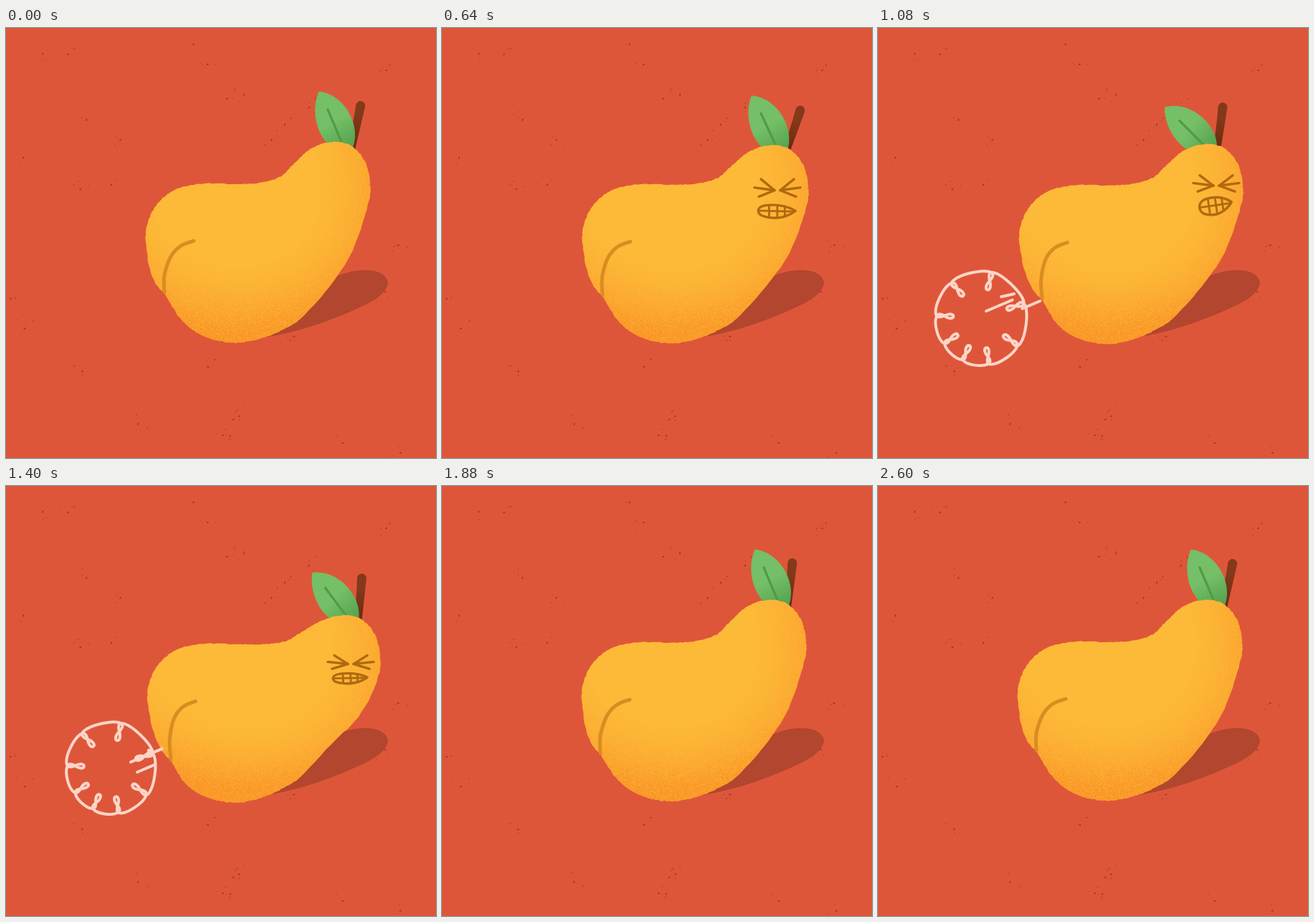
An HTML page with a canvas for the animation above (3080 ms loop, 600x600 px).

```html
<!DOCTYPE html>
<html lang="en">
<head>
<meta charset="utf-8">
<title>Pear</title>
<style>
html, body { margin: 0; width: 100%; height: 100%; overflow: hidden; background: #de5639; }
canvas { display: block; width: 600px; height: 600px; }
</style>
</head>
<body>
<canvas id="stage" width="600" height="600"></canvas>
<script>
const LOOP = 3080, STEP = 40, SIZE = 600, TAU = Math.PI * 2, DEG = Math.PI / 180;
const ctx = document.getElementById('stage').getContext('2d');

const clamp = (v, a = 0, b = 1) => Math.min(b, Math.max(a, v));
const mix = (a, b, k) => a + (b - a) * k;
const smooth = v => { v = clamp(v); return v * v * (3 - 2 * v); };
const ramp = (t, from, to) => smooth((t - from) / (to - from));
const bump = (t, from, to) => Math.sin(clamp((t - from) / (to - from)) * Math.PI) ** 2;

function random(seed) {
  return () => {
    seed = (seed * 1664525 + 1013904223) >>> 0;
    return seed / 4294967296;
  };
}

// Strain, shake while blowing, press down, then spring back
function pose(t) {
  const lift = bump(t, 120, 360), lean = bump(t, 420, 660);
  const release = 1 - ramp(t, 1760, 1880);
  const strain = ramp(t, 240, 400) * release;
  const blow = ramp(t, 640, 700) * (1 - ramp(t, 1200, 1320));
  const press = ramp(t, 1240, 1400) * release;
  const wave = Math.cos((t - 840) / 160 * TAU);
  const push = clamp((t - 1240) / 520);
  const free = Math.max(0, t - 1760), calm = Math.exp(-((free / 250) ** 2));
  const swing = Math.cos(free / 480 * TAU) * calm;
  const sway = free ? Math.sin(free / 480 * TAU) * calm : 0;
  return {
    lean, blow, press,
    hx: strain - 4 * lift + 30 * lean - 2 * blow * (1 + wave) + 68 * push ** 1.4 * swing,
    hy: 3 * strain - 17 * lift + 23 * lean - 2.5 * blow * (1 + wave) +
      42 * push ** .7 * (1 + free / 85) * swing,
    cx: 3 * strain + blow * (.5 - 4.5 * wave) + 6 * press,
    cy: 4 * strain - blow * (4.5 + 9.5 * wave) + 9 * press + 5 * sway,
    turn: -5 * strain - blow * (10.5 + 5 * wave),
    stem: 12 + 7 * strain - blow * (15.5 + 4.5 * wave) - 14 * press - 7 * sway,
    leaf: -24 - 2 * strain - 20 * blow - 12 * press,
    away: 1 - ramp(t, 240, 360) + ramp(t, 1740, 1860)
  };
}

function spline(points, steps) {
  const out = [], n = points.length;
  for (let i = 0; i < n - 1; i++) {
    const p = points[Math.max(0, i - 1)], q = points[i],
          r = points[i + 1], s = points[Math.min(n - 1, i + 2)];
    for (let j = 0; j < steps; j++) {
      const k = j / steps;
      out.push([0, 1].map(c => q[c] + .5 * k * (r[c] - p[c] +
        k * (2 * p[c] - 5 * q[c] + 4 * r[c] - s[c] + k * (3 * (q[c] - r[c]) + s[c] - p[c])))));
    }
  }
  out.push(points[n - 1]);
  return out;
}

function roughen(points, amount, seed) {
  const rnd = random(seed);
  return points.map(([x, y]) => [x + (rnd() - .5) * amount, y + (rnd() - .5) * amount]);
}

const outline = roughen(spline([
  [221, 371], [203, 345], [195, 295], [201, 263], [217, 239], [243, 223], [280, 217], [325, 218],
  [360, 215], [385, 206], [402, 189], [426, 168], [455, 159], [479, 163], [498, 181], [507, 210],
  [505, 247], [476, 325], [420, 397], [380, 424], [340, 437], [305, 438], [270, 427], [244, 406],
  [221, 371]
], 11), 1.1, 5);
const crease = spline([[221, 369], [221, 345], [230, 319], [244, 304], [262, 297]], 8);

// Points near the head follow it, points near the crease follow the crease
function bend([x, y], { hx, hy, cx, cy }) {
  const along = ((x - 300) * 170 - (y - 330) * 140) / 48500;
  const head = smooth((along - .35) / .65);
  const d2 = (x - 221) ** 2 + (y - 371) ** 2;
  const rump = smooth((420 - x) / 120) * (1 - head) * (.22 + .78 * Math.exp(-d2 / 2450));
  return [x + hx * head + cx * rump, y + hy * head + cy * rump];
}

function trace(points) {
  ctx.beginPath();
  points.forEach(p => ctx.lineTo(...p));
}

function line(x1, y1, x2, y2) {
  ctx.beginPath();
  ctx.moveTo(x1, y1);
  ctx.lineTo(x2, y2);
  ctx.stroke();
}

function pen(color, width) {
  ctx.strokeStyle = color;
  ctx.lineWidth = width;
  ctx.lineCap = ctx.lineJoin = 'round';
}

function layer(paint) {
  const c = document.createElement('canvas');
  c.width = c.height = SIZE;
  paint(c.getContext('2d'));
  return c;
}

// Grainy orange shade, stronger to the lower right
const shade = layer(g => {
  const img = g.createImageData(SIZE, SIZE), rnd = random(11);
  for (let i = 0; i < SIZE * SIZE; i++) {
    const dx = i % SIZE - 325, dy = Math.floor(i / SIZE) - 235;
    const d = Math.hypot(dx * (dx < 0 ? .85 : .93), dy * (dy < 0 ? .5 : 1.06));
    const v = clamp((d - 100) / 110) ** 1.5;
    img.data.set([249, 147, 38, 255 * clamp(v * (.4 + rnd()))], i * 4);
  }
  g.putImageData(img, 0, 0);
});

const ground = layer(g => {
  const rnd = random(23);
  g.fillStyle = '#de5639';
  g.fillRect(0, 0, SIZE, SIZE);
  for (let n = 0; n < 36; n++) {
    const x = rnd() * SIZE, y = rnd() * SIZE;
    for (let i = 0; i < 6; i++) {
      const r = i ? .3 + rnd() * .5 : 1, spread = i ? 26 : 0;
      g.fillStyle = `rgba(120, 44, 24, ${i ? .2 + rnd() * .4 : .65})`;
      g.beginPath();
      g.ellipse(x + (rnd() - .5) * spread, y + (rnd() - .5) * spread,
        r * 1.6, r, rnd() * 3, 0, TAU);
      g.fill();
    }
  }
  g.fillStyle = '#b2462e';
  g.beginPath();
  g.moveTo(300, 438);
  g.bezierCurveTo(390, 434, 450, 410, 500, 387);
  g.quadraticCurveTo(533, 371, 533, 354);
  g.bezierCurveTo(526, 330, 478, 336, 455, 350);
  g.lineTo(340, 420);
  g.fill();
});

function drawStem(x, y, angle) {
  ctx.save();
  ctx.translate(x, y);
  ctx.rotate(angle * DEG);
  const g = ctx.createLinearGradient(0, -66, 0, 0);
  g.addColorStop(.3, '#84391a');
  g.addColorStop(1, '#69290f');
  ctx.fillStyle = g;
  ctx.beginPath();
  ctx.moveTo(-5, 8);
  ctx.quadraticCurveTo(-4.5, -30, -6.5, -61);
  ctx.arc(0, -61, 6.5, Math.PI, 0);
  ctx.quadraticCurveTo(6, -30, 5, 8);
  ctx.fill();
  ctx.restore();
}

function drawLeaf(x, y, angle) {
  ctx.save();
  ctx.translate(x, y);
  ctx.rotate(angle * DEG);
  const g = ctx.createLinearGradient(-4, -40, 0, 0);
  g.addColorStop(0, '#74bf67');
  g.addColorStop(1, '#58a44f');
  ctx.fillStyle = g;
  ctx.beginPath();
  ctx.moveTo(0, -87);
  ctx.bezierCurveTo(32, -68, 34, -18, 11, 4);
  ctx.lineTo(-4, 4);
  ctx.bezierCurveTo(-30, -14, -27, -62, 0, -87);
  ctx.fill();
  pen('#509a48', 3.2);
  line(1, -59, 0, -8);
  ctx.restore();
}

function drawFace({ hx, hy, lean, blow, press, away }) {
  if (away > .98) return;
  ctx.save();
  ctx.translate(465 + 6 * blow + 2 * press + hx + away * 48, 220 - 5 * blow + 5 * press + hy);
  ctx.scale(1 - .65 * away, 1);
  pen('#b0690f', 3.4);

  const squash = 1 - .1 * blow - .25 * press - .3 * lean;
  for (const side of [-1, 1]) {
    for (const [x, y] of [[19, -16], [28, -4], [22, 9]])
      line(side * 4, 2, side * (4 + x), 2 + y * squash);
  }

  ctx.translate(-1, 32 - 2 * blow - 10 * press - 8 * lean);
  ctx.rotate(.04 - .16 * blow - .04 * press);
  const a = 26 - 3.2 * blow - 2 * press, b = 9 + 2.8 * blow - 2 * press - 2 * lean;
  const mouth = new Path2D();
  mouth.moveTo(a, -b * .2);
  mouth.bezierCurveTo(a * .5, -b * 1.1, -a * .2, -b * 1.1, -a * .6, -b * .9);
  mouth.bezierCurveTo(-a * 1.12, -b * .6, -a * 1.12, b * .6, -a * .6, b * .9);
  mouth.bezierCurveTo(0, b * 1.3, a * .6, b * .8, a, -b * .2);
  ctx.stroke(mouth);
  ctx.clip(mouth);
  ctx.lineWidth = 2.8;
  line(-a, 0, a, -b * .1);
  for (const k of [-.42, .02, .42]) line(a * k, -b, a * (k + .03), b * 1.1);
  ctx.restore();
}

// Curly cloud: round lobes joined by small inner loops
function drawPuff(t) {
  if (t < 680 || t >= 1740) return;
  const grow = ramp(t, 620, 800), fade = 1 - ramp(t, 1560, 1740), drift = (t - 840) / 560;
  const x = 138 + 8 * clamp(drift * 1.6), y = 408 - 14 * clamp(drift) ** 2;
  const size = 52 - 2 * clamp(drift), lobes = 8;
  const knot = i => {
    const phi = i / lobes * TAU - 2.02, a = phi + .28 * Math.sin(phi + .9);
    return { x: x + size * Math.cos(a), y: y + size * 1.06 * Math.sin(a), a };
  };
  // A point leaving the knot outwards by "out" and along the ring by "side"
  const off = (k, side, out) => [
    k.x + out * Math.cos(k.a) - side * Math.sin(k.a),
    k.y + out * Math.sin(k.a) + side * Math.cos(k.a)
  ];

  ctx.save();
  ctx.translate(225, 375);
  ctx.scale(grow, grow);
  ctx.translate(-225, -375);
  ctx.globalAlpha = fade;
  pen('#fcd5c8', 1 + 3 * fade);
  ctx.beginPath();
  for (let i = 0; i < lobes; i++) {
    const p = knot(i), q = knot(i + 1);
    const out = .76 * Math.hypot(q.x - p.x, q.y - p.y), side = out * .55;
    if (!i) ctx.moveTo(p.x, p.y);
    ctx.bezierCurveTo(...off(p, -side, out), ...off(q, side, out), q.x, q.y);
    ctx.bezierCurveTo(...off(q, -10, -17), ...off(q, 10, -17), q.x, q.y);
  }
  ctx.stroke();

  const phase = (t + 120) % 240 / 240;
  const streak = (x1, y1, x2, y2, from, length) => {
    const a = clamp(from), b = clamp(from + length);
    if (b - a > .05) line(mix(x1, x2, a), mix(y1, y2, a), mix(x1, x2, b), mix(y1, y2, b));
  };
  streak(224, 364, 151, 395, (phase + .9) % 1 - .4 + .25 * bump(phase, 0, .66), .6);
  streak(226, 381, 172, 404, phase, .46);
  streak(212, 366, 172, 375, .55 - phase, .45 - phase);
  ctx.restore();
}

function drawBody(p) {
  ctx.save();
  trace(outline.map(q => bend(q, p)));
  ctx.closePath();
  ctx.fillStyle = '#fdb938';
  ctx.fill();
  ctx.clip();

  // Stretch the shade along the axis from rump to head
  ctx.save();
  const ax = 170 / 43300, ay = -120 / 43300;
  ctx.translate(300, 330);
  ctx.transform(1 + p.hx * ax, p.hy * ax, p.hx * ay, 1 + p.hy * ay, 0, 0);
  ctx.drawImage(shade, -300, -330);
  ctx.restore();

  pen('#d98d20', 5);
  trace(crease.map(q => bend(q, p)));
  ctx.stroke();
  drawFace(p);
  ctx.restore();
}

function draw(t) {
  const p = pose(t), y = 168 + p.hy;
  ctx.drawImage(ground, 0, 0);
  drawStem(482 + p.hx + p.turn, y, p.stem);
  drawLeaf(472 + p.hx + p.turn, y, p.leaf);
  drawBody(p);
  drawPuff(t);
}

const start = performance.now();
function tick() {
  const t = (performance.now() - start) % LOOP;
  draw(Math.min(2600, Math.floor(t / STEP) * STEP));
  requestAnimationFrame(tick);
}
tick();
</script>
</body>
</html>
```
